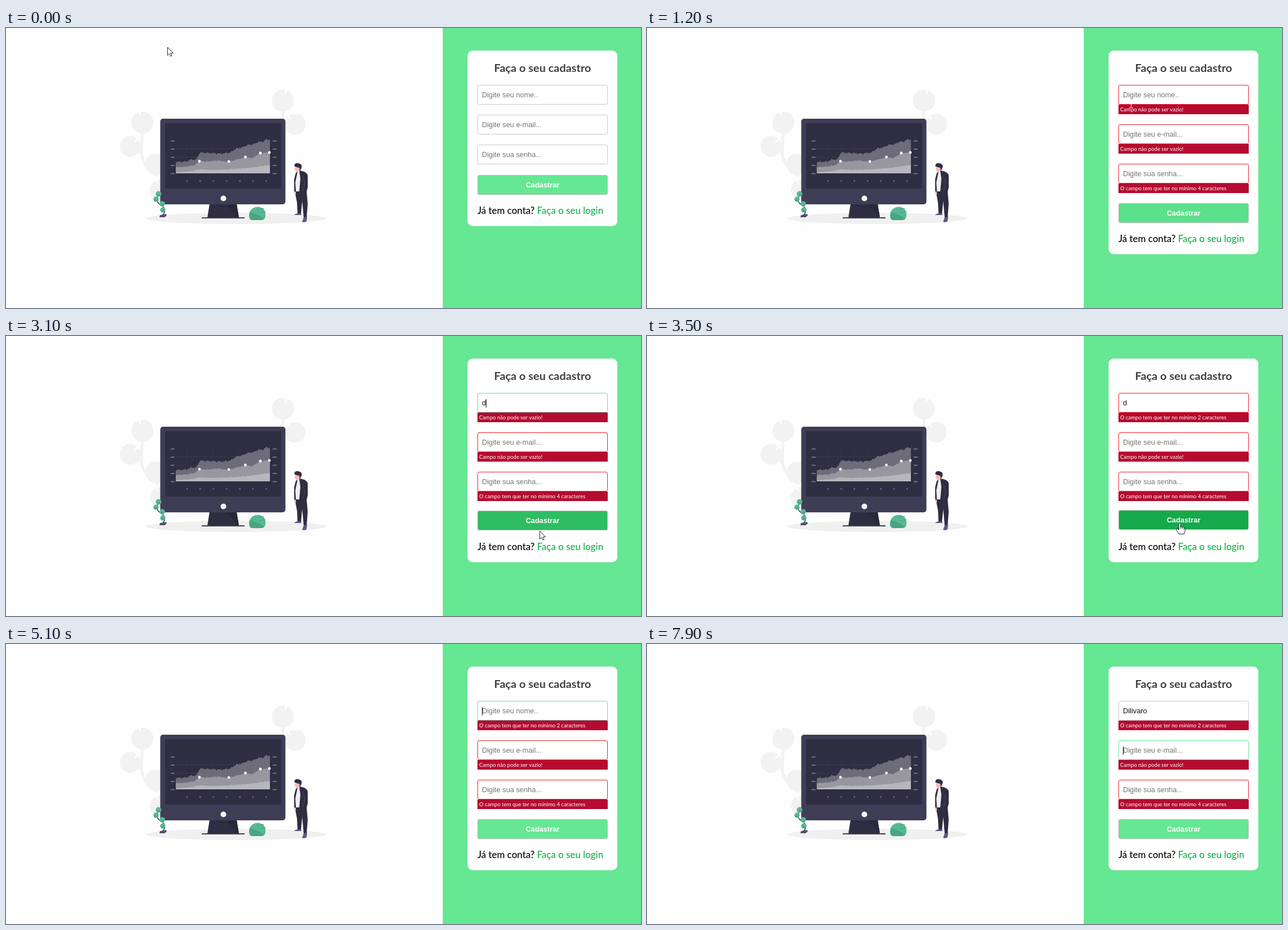
These frames come from a looping animation (1126x497 px, 8 s). An HTML page with a canvas:

```html
<!DOCTYPE html>
<html lang="pt-BR">
<head>
<meta charset="utf-8">
<title>Cadastro</title>
<style>
  html, body { margin: 0; width: 100%; height: 100%; overflow: hidden; background: #fefefe; }
  canvas { display: block; }
</style>
</head>
<body>
<canvas id="stage" width="1126" height="497"></canvas>
<script>
const ctx = document.getElementById('stage').getContext('2d');
const LOOP = 8000, STEP = 100;
const SANS = '"Liberation Sans", Arial, sans-serif';
const HUMAN = 'Lato, sans-serif';
const NAVY = '#3f3d56', DARK = '#2f2d41', LEAF = '#57b894', PALE = '#f2f2f2', SKIN = '#ffb9b9';

// Timeline
const TYPED = [[0, ''], [2700, 'd'], [5100, ''], [5300, 'D'], [5800, 'Di'], [6000, 'Dil'],
  [6100, 'Dili'], [6300, 'Diliv'], [6500, 'Dilivar'], [6700, 'Dilivaro']];
const FOCUS = [[0, -1], [1700, 0], [3300, -1], [4300, 0], [7900, 1]];
const HOVERS = [[400, 1000], [2970, 3700]];
const POINTER = [
  [0, 286, 34, 'arrow'], [100, 330, 52, 'arrow'], [300, 700, 190, 'arrow'], [400, 880, 258, 'arrow'],
  [500, 935, 280, 'hand'], [700, 951, 290, 'hand'], [1000, 951, 290, 'hand'], [1100, 905, 212, 'arrow'],
  [1200, 858, 134, 'beam'], [1600, 850, 119, 'beam'], [2600, 850, 119, 'none'], [2700, 936, 255, 'beam'],
  [2800, 936, 255, 'beam'], [2900, 946, 300, 'arrow'], [3000, 947, 330, 'hand'], [3100, 946, 346, 'arrow'],
  [3200, 945, 332, 'hand'], [3700, 945, 332, 'hand'], [3800, 905, 228, 'arrow'], [3900, 857, 118, 'beam'],
  [5100, 857, 118, 'none'], [7400, 856, 121, 'beam'], [7700, 912, 184, 'beam'], [LOOP, 912, 184, 'beam']
];

const clamp = v => Math.max(0, Math.min(1, v));
const easeOut = p => 1 - (1 - clamp(p)) ** 2;
const latest = (keys, t) => keys.filter(k => k[0] <= t).pop();
const mix = (a, b, k) => `rgb(${a.map((v, i) => Math.round(v + (b[i] - v) * k))})`;

// Drawing helpers
function rect(x, y, w, h, color) {
  ctx.fillStyle = color;
  ctx.fillRect(x, y, w, h);
}
function round(x, y, w, h, r, fill, stroke) {
  ctx.beginPath();
  ctx.roundRect(x, y, w, h, r);
  if (fill) { ctx.fillStyle = fill; ctx.fill(); }
  if (stroke) { ctx.strokeStyle = stroke; ctx.lineWidth = 1; ctx.stroke(); }
}
function oval(x, y, rx, ry, color) {
  ctx.beginPath();
  ctx.ellipse(x, y, rx, ry, 0, 0, Math.PI * 2);
  ctx.fillStyle = color;
  ctx.fill();
}
const dot = (x, y, r, color) => oval(x, y, r, r, color);
function shape(d, fill, stroke, width = 1) {
  const path = new Path2D(d);
  if (fill) { ctx.fillStyle = fill; ctx.fill(path); }
  if (stroke) {
    ctx.strokeStyle = stroke;
    ctx.lineWidth = width;
    ctx.lineCap = ctx.lineJoin = 'round';
    ctx.stroke(path);
  }
}
function text(str, x, y, font, color, align = 'left') {
  ctx.font = font;
  ctx.fillStyle = color;
  ctx.textAlign = align;
  ctx.fillText(str, x, y);
}

// Illustration
function notchedLeaf(x, y, r, angle) {
  ctx.beginPath();
  ctx.arc(x, y, r, angle + 0.13, angle - 0.13 + Math.PI * 2);
  ctx.lineTo(x + Math.cos(angle) * r * 0.5, y + Math.sin(angle) * r * 0.5);
  ctx.fillStyle = PALE;
  ctx.fill();
}
function area(points, rough, color) {
  ctx.beginPath();
  ctx.moveTo(301, 258);
  for (let x = 301; x <= 468; x++) {
    const i = Math.max(1, points.findIndex(p => p[0] >= x));
    const [x0, y0] = points[i - 1], [x1, y1] = points[i];
    const jag = rough * (Math.sin(x * 1.3) + Math.sin(x * 0.61));
    ctx.lineTo(x, y0 + (y1 - y0) * (x - x0) / (x1 - x0) + jag);
  }
  ctx.lineTo(468, 258);
  ctx.fillStyle = color;
  ctx.fill();
}
function drawPlants() {
  notchedLeaf(242, 168, 19.5, -1.85);
  notchedLeaf(220, 210, 18.5, -0.75);
  notchedLeaf(266, 242, 19, -0.4);
  notchedLeaf(273, 287, 18, -1.9);
  shape('M242 172 L240 222 Q241 244 268 262', null, PALE, 5);
  shape('M224 212 Q240 217 241 234', null, PALE, 3);
  notchedLeaf(491, 129, 19.5, -1.25);
  notchedLeaf(513, 171, 18.5, -2.3);
  shape('M491 140 V170', null, PALE, 5);
  oval(408, 338, 160, 10, '#f0f0f0');
}
function drawMonitor() {
  shape('M361 312 H409 L413 337 H357 Z', DARK);
  shape('M390 313 H409 L413 336 Z', '#292839');
  rect(347, 336, 76, 2, NAVY);
  round(273.5, 161, 222, 152, 5, NAVY);
  rect(282, 169, 206, 116, DARK);
  dot(385.5, 302.5, 5, '#f5f5f5');

  ctx.setLineDash([2, 3]);
  for (let i = 0; i < 7; i++) shape(`M${320.5 + i * 23.5} 200 V257`, null, '#3a384c');
  for (const y of [214.5, 229.5]) shape(`M302 ${y} H468`, null, '#444256');
  ctx.setLineDash([]);
  area([[301, 238], [320, 237], [329, 233], [337, 234], [344, 221], [362, 222], [381, 223], [398, 221],
    [408, 214], [419, 212], [427, 208], [440, 206], [447, 202], [455, 202], [461, 198], [468, 198]], 0.8, '#6e6c7b');
  area([[301, 247], [320, 246], [335, 243], [343, 237], [360, 237], [375, 235], [395, 238],
    [410, 233], [425, 230], [437, 231], [451, 222], [468, 221]], 0.4, '#98969f');
  area([[301, 256], [330, 254], [342, 251], [365, 252], [395, 251], [425, 249], [448, 246], [468, 243]], 0.3, '#b7b6bd');
  for (let i = 0; i < 5; i++) {
    const y = 199.5 + i * 14.5;
    rect(292, y, 7, 2, '#716f80');
    rect(473, y, 7, 2, '#716f80');
  }
  for (let i = 0; i < 7; i++) dot(321 + i * 23.4, 271.5, 1.5, '#6b6979');
  for (const [x, y] of [[343, 236.5], [395, 237], [424.5, 229], [451, 222], [467, 221]]) dot(x, y, 2.4, '#fff');
}
function drawPerson() {
  shape('M523 289 H533 L535 312 L533 338 H528 L526 315 Z', DARK);
  shape('M512 289 H525 L525 310 L523 331 H517 L516 310 Z', DARK);
  shape('M517 329 H523 L524 332 H511 Q512 330 517 329 Z', '#575a89');
  shape('M528 336 L534 335 L533 343 Q530 346 525 344 Z', '#575a89');
  shape('M513 257 L521 253 L524 290 H512 Z', '#eeeef2');
  shape('M520 253 Q532 254 535 261 L535 283 L533 291 L520 290 L522 268 Z', DARK);
  shape('M514 257 L517 255 L513 274 L514 290 L511 291 L511 268 Z', DARK);
  shape('M525 262 L530 276 L526 289', null, '#45435c');
  shape('M511 290 L514 291 L514 296 L511 294 Z', SKIN);
  oval(516.5, 249.5, 4.5, 6, SKIN);
  shape('M511 245 Q512 239 518 240 Q526 241 524 248 L521 254 L520 248 Q515 247 513 246 Z', DARK);
}
function drawForeground() {
  shape('M431 333 C431 313 459 313 460 329 Q461 341 453 341 H437 Q431 341 431 333 Z', LEAF);
  shape('M432 327 Q445 329 457 338 L453 341 H437 Q430 340 432 327 Z', '#48a482');
  shape('M447 322 L457 320 M449 328 L460 326', null, '#48a482');

  shape('M271 295 Q263 309 276 315 Q286 322 278 332', null, NAVY, 1.5);
  for (const [x, y, r] of [[270.5, 294.5, 5], [266, 304, 4.7], [277, 312, 4.8], [278, 323, 4.7]]) {
    dot(x, y, r, LEAF);
    shape(`M${x - r * 0.6} ${y + 1} Q${x} ${y + r} ${x + r * 0.8} ${y + 1}`, '#429b79');
  }
  shape('M273 332 L284 330 L285 333 L281 336 H272 Z', '#55536a');
  drawPerson();
}

// Form
function drawField(y, border, focused) {
  round(836.5, y + 0.5, 230, 34, 2.5, '#fff', border);
  if (focused) rect(837, y + 34, 229, 1, '#789383');
}
function drawForm(t) {
  const invalid = t >= 800;
  const shift = invalid ? 50 : 0;
  const pitch = invalid ? 70 : 53;
  const focus = latest(FOCUS, t)[1];
  const name = latest(TYPED, t)[1];
  const inputFont = `12.8px ${SANS}`;

  rect(774.5, 0, 352, 497, '#66e793');
  round(818.5, 40, 265.5, 311.5 + shift, 9, '#fff');
  text('Faça o seu cadastro', 951.5, 78, `bold 19.9px ${HUMAN}`, '#404040', 'center');

  const hints = ['Digite seu nome..', 'Digite seu e-mail...', 'Digite sua senha...'];
  const empty = 'Campo não pode ser vazio!';
  const tooShort = n => `O campo tem que ter no mínimo ${n} caracteres`;
  const errors = [t < 3300 ? empty : tooShort(2), empty, tooShort(4)];
  hints.forEach((hint, i) => {
    const y = 101 + i * pitch;
    const value = i ? '' : name;
    const visited = i === 0 && t >= 7900;
    if (invalid) {
      rect(836, y + 35, 231, 17, '#b50b30');
      text(errors[i], 839, y + 47, `9.5px ${HUMAN}`, '#fff');
    }
    drawField(y, focus === i ? '#66e793' : invalid && !visited ? '#f0202c' : '#c9c9c9', focus === i);
    text(value || hint, 844, y + 22, inputFont, value ? '#111' : '#757575');
    if (focus === i) {
      const since = Math.max(...[...TYPED, ...FOCUS].map(k => k[0]).filter(k => k <= t));
      const caretX = 844 + Math.round(ctx.measureText(value).width);
      if ((t - since) % 1000 < 500) rect(caretX, y + 11, 1, 15, '#111');
    }
  });

  const hover = Math.max(...HOVERS.map(([on, off]) => easeOut((t - on) / 300) * (1 - easeOut((t - off) / 300))));
  const top = 261 + shift - Math.round(hover * 2);
  round(836.5, top + 0.5, 230, 34, 2.5, mix([102, 231, 147], [21, 169, 73], hover), '#b0bcb3');
  text('Cadastrar', 951.5, top + 22, `bold 12.8px ${SANS}`, '#fff', 'center');

  const linkFont = `500 16.9px ${HUMAN}`;
  text('Já tem conta? ', 836, 330 + shift, linkFont, '#050505');
  text('Faça o seu login', 836 + ctx.measureText('Já tem conta? ').width, 330 + shift, linkFont, '#0fb245');
}

// Mouse pointer
const CURSORS = {
  arrow() {
    shape('M.5 .5 V14.5 L3.6 11.6 L6 16.2 L8.2 15.2 L6 10.7 H10.3 Z', '#fff', '#22223a');
  },
  hand() {
    shape('M-2 1 Q-.5 -1.5 1 1 V7 Q3 5.5 4 7.5 Q6 6.5 7 8.5 Q9 8 9 10.5 V14 L7 19.5 H-2 L-6.5 12 Q-6.5 9 -4 10.5 L-2 12 Z',
      '#fff', '#22223a');
    shape('M1 7 V10 M4 8 V10 M7 9 V11', null, '#22223a');
  },
  beam() {
    shape('M-2.5 -7.5 H-.5 M1.5 -7.5 H3.5 M.5 -6.5 V6.5 M-2.5 7.5 H-.5 M1.5 7.5 H3.5', null, '#ececec');
  },
  none() {}
};
function drawPointer(t) {
  const i = POINTER.findIndex(k => k[0] > t);
  const [t0, x0, y0, kind] = POINTER[i - 1], [t1, x1, y1] = POINTER[i];
  const p = (t - t0) / (t1 - t0);
  ctx.save();
  ctx.translate(Math.round(x0 + (x1 - x0) * p), Math.round(y0 + (y1 - y0) * p));
  CURSORS[kind]();
  ctx.restore();
}

let shown = -1;
const start = performance.now();
function frame() {
  const t = Math.floor((performance.now() - start) % LOOP / STEP) * STEP;
  if (t !== shown) {
    shown = t;
    rect(0, 0, 1126, 497, '#fefefe');
    drawPlants();
    drawMonitor();
    drawForeground();
    drawForm(t);
    drawPointer(t);
  }
  requestAnimationFrame(frame);
}
frame();
</script>
</body>
</html>
```
